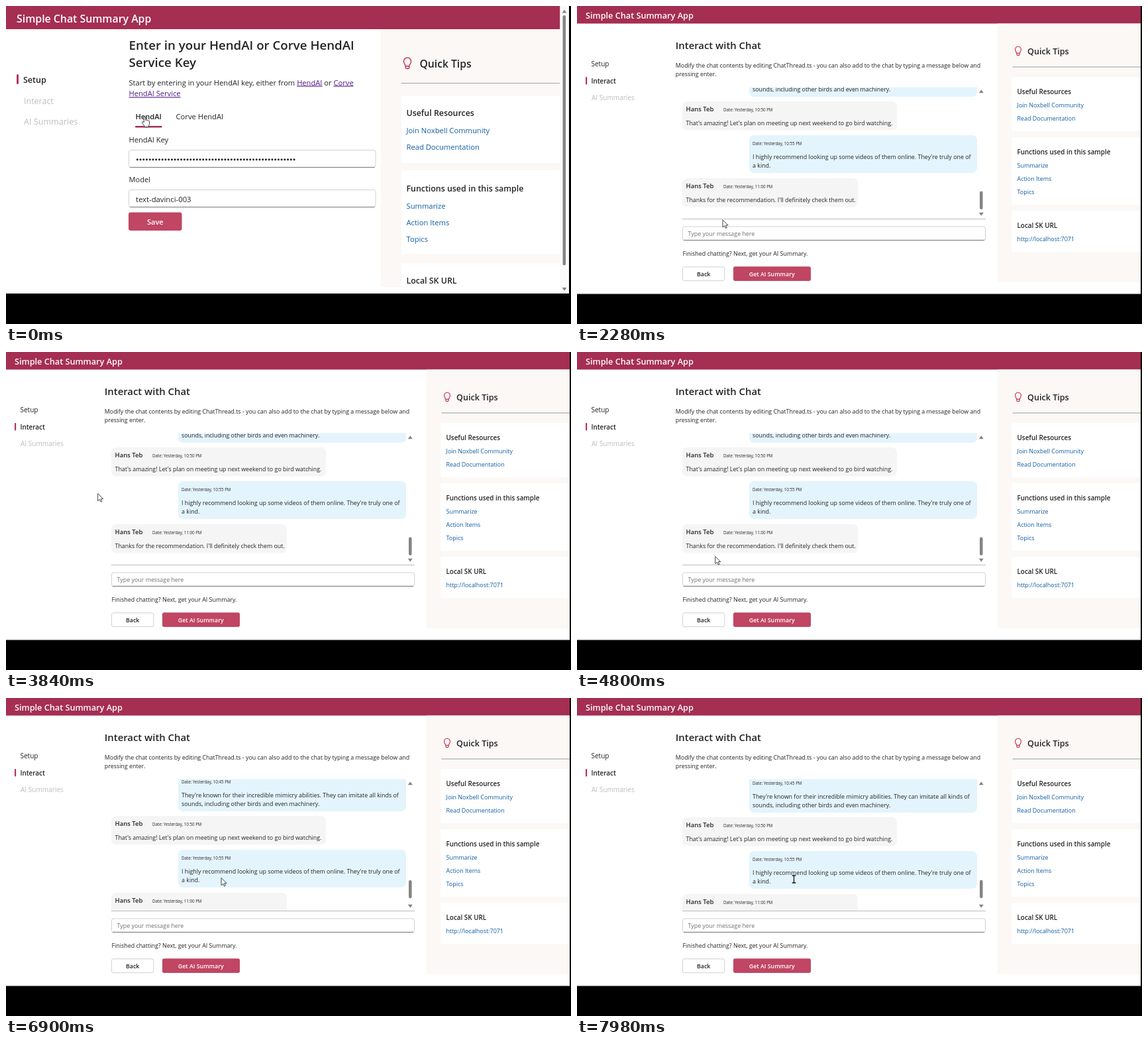
Write an HTML page that moves like this. It is 853x480 px and loops after 8000 ms.

```html
<!DOCTYPE html>
<html lang="en">
<head>
<meta charset="utf-8">
<title>Simple Chat Summary App</title>
<style>
html, body { margin: 0; width: 100%; height: 100%; overflow: hidden; background: #000; }
svg { display: block; width: 853px; height: 480px; font-family: "Open Sans", "Noto Sans", sans-serif; }
text { fill: #242424; white-space: pre; }
.b { font-weight: 600; }
.w { fill: #fff; }
.off { fill: #bdbdbd; }
.hint { fill: #707070; }
.link { fill: #115ea3; }
.visited { fill: #551a8b; text-decoration: underline; }
</style>
</head>
<body>
<svg id="stage" viewBox="0 0 853 480"></svg>
<script>
const LOOP = 8000, CUT = 2220;
const WINE = '#a52e53', ROSE = '#c04663', PANEL = '#fbf8f6';

// y is the middle of the capitals
const text = (x, y, size, str, cls = '') =>
  `<text x="${x}" y="${(y + size * 0.36).toFixed(2)}" font-size="${size}" class="${cls}">${str}</text>`;
const visited = str => `<tspan class="visited">${str}</tspan>`;
const box = (x, y, x2, y2, fill, r = 0, extra = '') =>
  `<rect x="${x}" y="${y}" width="${x2 - x}" height="${y2 - y}" rx="${r}" fill="${fill}" ${extra}/>`;
const rule = (x, x2, y, color) => box(x, y, x2, y + 1, color);
const field = (x, y, x2, y2, line) =>
  box(x + .5, y + .5, x2 - .5, y2 - .5, '#fff', 3, 'stroke="#d1d1d1"') + rule(x + 2, x2 - 2, y2 - 1, line);
const triangle = (x, y, dir) =>
  `<path d="M${x - 3.5} ${y + 2.5 * dir}h7l-3.5 ${-5 * dir}z" fill="#858585"/>`;
const bulb = (x, y, k) =>
  `<g transform="translate(${x} ${y}) scale(${k})" fill="none" stroke="#c0304f" stroke-width="1.4">
  <path d="M-2.8 4.2C-3 2-5.5 .8-5.5-3a5.5 5.5 0 0 1 11 0C5.5 .8 3 2 2.8 4.2zM-2.7 4.2V6.6Q-2.6 8 -1.2 8H1.2Q2.6 8 2.7 6.6V4.2"/></g>`;

const setup = () => [
  box(0, 0, 850, 434, '#fff'), box(0, 0, 836.5, 35, WINE),
  text(16, 19.5, 15.85, 'Simple Chat Summary App', 'b w'),
  box(16, 103, 19, 118, '#b93358', 1.5),
  text(26, 111.3, 12.5, 'Setup', 'b'),
  text(27, 143, 12.5, 'Interact', 'off'),
  text(27, 174.3, 12.6, 'AI Summaries', 'off'),
  text(185.5, 59, 18.7, 'Enter in your HendAI or Corve HendAI', 'b'),
  text(185.5, 85.5, 18.7, 'Service Key', 'b'),
  text(185.5, 115.5, 11.15, `Start by entering in your HendAI key, either from ${visited('HendAI')} or ${visited('Corve')}`),
  text(185.5, 132.3, 11.15, visited('HendAI Service')),
  text(195.5, 167, 11.1, 'HendAI', 'b'),
  text(256.5, 167, 11.2, 'Corve HendAI'),
  `<rect id="tab" x="195" y="181" width="40.5" height="2.6" rx="1.3"/>`,
  text(185.5, 202, 11.15, 'HendAI Key'),
  field(185, 217, 558.5, 244, '#777'),
  `<path d="M198.3 231.8H435.2" stroke="#242424" stroke-width="3.1" stroke-linecap="round" stroke-dasharray="0 4.735"/>`,
  text(185.5, 261.6, 11.1, 'Model'),
  field(185, 277, 558.5, 304, '#777'),
  text(196, 291.6, 11.3, 'text-davinci-003'),
  `<rect id="save" x="185" y="311.6" width="80.5" height="27.4" rx="3.3"/>`,
  text(213, 326, 11, 'Save', 'b w'),
  box(566, 35, 836.5, 424, PANEL),
  bulb(606, 86.5, 1),
  text(624.5, 87.5, 15.7, 'Quick Tips', 'b'),
  rule(596.5, 836, 116, '#a8a2a2'),
  box(597, 136, 836.5, 237, '#fff'), box(597, 248, 836.5, 374, '#fff'), box(597, 388, 836.5, 424, '#fff'),
  text(604.5, 162, 12.4, 'Useful Resources', 'b'),
  text(604.5, 188, 11.2, 'Join Noxbell Community', 'link'),
  text(604.5, 213, 11.2, 'Read Documentation', 'link'),
  text(604.5, 276, 12.4, 'Functions used in this sample', 'b'),
  text(604.5, 301.5, 11.2, 'Summarize', 'link'),
  text(604.5, 327, 11.2, 'Action Items', 'link'),
  text(604.5, 351.5, 11.2, 'Topics', 'link'),
  text(604.5, 414.5, 12.4, 'Local SK URL', 'b'),
  box(836.5, 0, 850, 434, '#fafafa'),
  box(840.5, 14, 845, 391.5, '#858585', 2.2),
  triangle(843, 8, 1), triangle(843, 427.5, -1)
].join('');

const reply = (y, x2, time, str) =>
  box(159, y, x2, y + 43.5, '#f5f5f5', 7) + text(164.5, y + 12, 9.5, 'Hans Teb', 'b') +
  text(221, y + 12.7, 6.2, `Date: Yesterday, ${time} PM`) + text(164.5, y + 32.7, 8.88, str);
const mine = (y, time, ...lines) =>
  box(260, y, 604, y + 57, '#e4f4fd', 7) + text(265, y + 12.7, 6.2, `Date: Yesterday, ${time} PM`) +
  lines.map((s, i) => text(265, y + 32.6 + i * 13.4, 8.88, s)).join('');

const chat = () => [
  box(0, 0, 851, 434.5, '#fff'), box(0, 0, 851, 26.5, WINE),
  rule(0, 851, 433.5, '#cdd5dc'),
  text(13, 14.3, 12.7, 'Simple Chat Summary App', 'b w'),
  box(13, 107, 15.2, 118.5, '#b93358', 1),
  text(21.5, 87.6, 10, 'Setup'),
  text(21.5, 113, 9.85, 'Interact', 'b'),
  text(22, 138.2, 10.05, 'AI Summaries', 'off'),
  text(148.8, 60, 14.9, 'Interact with Chat', 'b'),
  text(148.8, 89.4, 8.88, 'Modify the chat contents by editing ChatThread.ts - you can also add to the chat by typing a message below and'),
  text(148.8, 102.7, 8.88, 'pressing enter.'),
  '<g clip-path="url(#view)"><g id="thread">',
  mine(80, '10:45', "They're known for their incredible mimicry abilities. They can imitate all kinds of", 'sounds, including other birds and even machinery.'),
  reply(144, 483, '10:50', "That's amazing! Let's plan on meeting up next weekend to go bird watching."),
  mine(195, '10:55', "I highly recommend looking up some videos of them online. They're truly one of", 'a kind.'),
  reply(260, 424, '11:00', "Thanks for the recommendation. I'll definitely check them out."),
  '</g></g>',
  triangle(610.3, 128.8, 1), triangle(610.3, 314.3, -1),
  '<rect id="thumb" x="608" width="4.6" height="27.5" rx="2.3" fill="#858585"/>',
  rule(159, 617, 321, '#b9bcbe'),
  field(159, 332.5, 617, 354, '#707278'),
  text(167.5, 343.5, 8.88, 'Type your message here', 'hint'),
  text(159.5, 374, 8.88, 'Finished chatting? Next, get your AI Summary.'),
  box(159.5, 393.8, 222.8, 414.7, '#fff', 2.7, 'stroke="#d1d1d1"'),
  text(181, 404.6, 8.8, 'Back', 'b'),
  box(236, 393.3, 353, 415, ROSE, 2.7),
  text(259.8, 404.6, 8.8, 'Get AI Summary', 'b w'),
  box(635, 26.5, 851, 417, PANEL),
  bulb(666, 68, .8),
  text(680, 68.8, 12.6, 'Quick Tips', 'b'),
  rule(657.5, 851, 91.5, '#8ba5a5'),
  box(656, 107, 851, 189, '#fff'), box(656, 198, 851, 300, '#fff'), box(656, 309, 851, 371, '#fff'),
  text(664.5, 129, 9.9, 'Useful Resources', 'b'),
  text(664.5, 149.4, 8.95, 'Join Noxbell Community', 'link'),
  text(664.5, 169.4, 8.95, 'Read Documentation', 'link'),
  text(664.5, 220, 9.9, 'Functions used in this sample', 'b'),
  text(664.5, 240.4, 8.95, 'Summarize', 'link'),
  text(664.5, 260.4, 8.95, 'Action Items', 'link'),
  text(664.5, 280.4, 8.95, 'Topics', 'link'),
  text(664.5, 331, 9.9, 'Local SK URL', 'b'),
  text(664.5, 351.4, 8.95, 'http://localhost:7071', 'link')
].join('');

const cursors = `
<path id="arrow" d="M0 0V11.2L2.7 8.8L4.4 12.6L6.2 11.8L4.6 8.1H8.1Z" fill="#fff" stroke="#333" stroke-width=".9"/>
<path id="hand" d="M-1.3 8.5V1Q-1.3 0 0 0T1.3 1V5.2Q2.6 4.4 3.4 5.6Q4.8 4.9 5.4 6.2Q7 5.8 7 7.6V10.5Q7 12.5 5.8 13.6V15.5H-.6V13.8Q-2.3 12-4 9.3Q-4.2 7.8-2.9 7.7Z" fill="#fff" stroke="#222" stroke-width=".9"/>
<path id="beam" d="M-2.8 -5.5H-1Q0 -5.5 0 -4.6Q0 -5.5 1 -5.5H2.8M0 -5V5M-2.8 5.5H-1Q0 5.5 0 4.6Q0 5.5 1 5.5H2.8" fill="none" stroke="#111" stroke-width="1.3"/>`;

const stage = document.getElementById('stage');
stage.innerHTML = `<clipPath id="view"><rect x="150" y="122.5" width="470" height="198.5"/></clipPath>
<rect width="853" height="480"/><g id="setup">${setup()}</g><g id="chat">${chat()}</g>${cursors}`;
const el = Object.fromEntries([...stage.querySelectorAll('[id]')].map(n => [n.id, n]));

// start, end, x, y of each move
const start = [209.5, 167];
const moves = [
  [700, 1600, 220.5, 323.5],
  [2260, 2760, 121.5, 190.5],
  [3500, 4700, 208.7, 308.5],
  [5100, 6200, 294.5, 271.8],
  [6350, 6700, 325, 271.5],
  [7050, 7400, 327.5, 273.5]
];
const clamp = p => Math.min(1, Math.max(0, p));
const smooth = p => p * p * (3 - 2 * p);

function pointer(t) {
  let [x, y] = start;
  for (const [a, b, tx, ty] of moves) {
    const p = smooth(clamp((t - a) / (b - a)));
    x += (tx - x) * p;
    y += (ty - y) * p;
  }
  return [x, y];
}

function cursorKind(t, y) {
  if (t < CUT) return y < 185 || y > 311 ? 'hand' : (y > 217 && y < 244) || (y > 277 && y < 304) ? 'beam' : 'arrow';
  return (t > 5950 && t < 6600) || t > 7100 ? 'beam' : 'arrow';
}

const show = (node, on) => node.setAttribute('visibility', on ? 'visible' : 'hidden');

function draw(t) {
  const [x, y] = pointer(t), kind = cursorKind(t, y);
  show(el.setup, t < CUT);
  show(el.chat, t >= CUT);
  for (const id of ['arrow', 'hand', 'beam']) show(el[id], id === kind);
  el[kind].setAttribute('transform', `translate(${x.toFixed(2)} ${y.toFixed(2)})`);
  el.tab.setAttribute('fill', y < 185 ? WINE : ROSE);
  el.save.setAttribute('fill', y > 311 ? WINE : ROSE);
  const scroll = 36 * (1 - (1 - clamp((t - 6653) / 400)) ** 3);
  el.thread.setAttribute('transform', `translate(0 ${scroll.toFixed(2)})`);
  el.thumb.setAttribute('y', (279.5 - scroll * .135).toFixed(2));
}

const origin = performance.now();
function tick() {
  draw((performance.now() - origin) % LOOP);
  requestAnimationFrame(tick);
}
tick();
</script>
</body>
</html>
```
